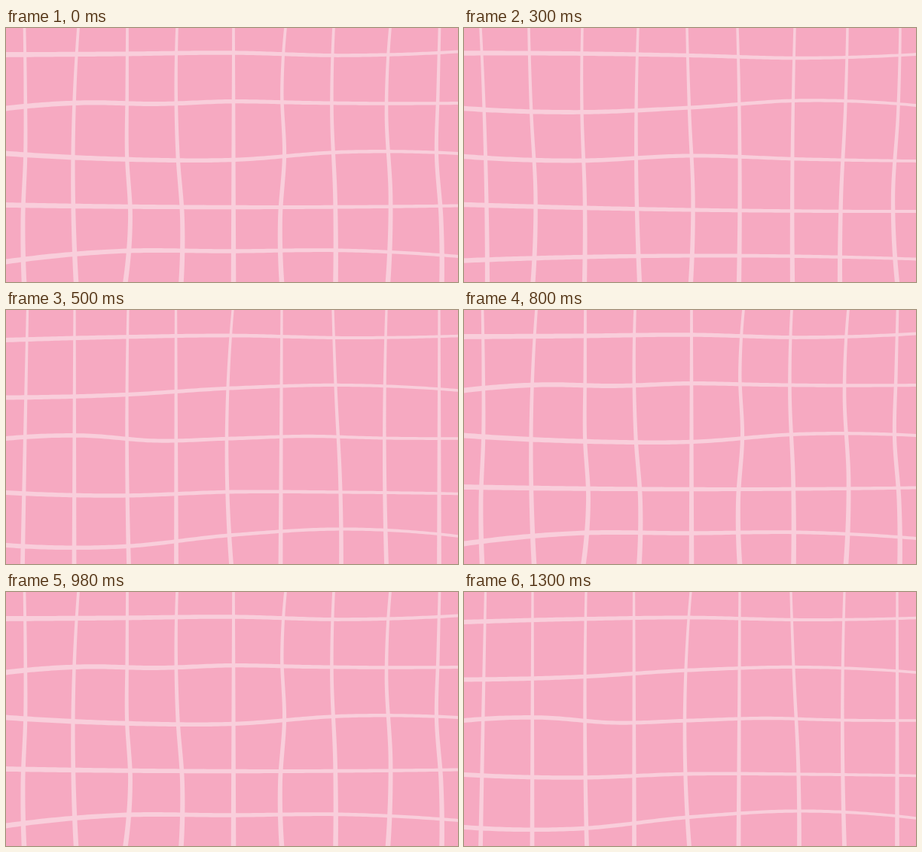
These frames come from a looping animation (600x338 px, 1500 ms). An HTML page with a canvas:

```html
<!DOCTYPE html>
<html lang="en">
<head>
<meta charset="utf-8">
<title>Wobbly grid</title>
<style>
  html, body { margin: 0; height: 100%; overflow: hidden; background: #f6a9c1; }
  canvas { display: block; }
</style>
</head>
<body>
<canvas id="stage" width="600" height="338"></canvas>
<script>
const W = 600, H = 338;
const ctx = document.getElementById('stage').getContext('2d');
const mix = (a, b, u) => a + (b - a) * u;

// Point before b that continues the bend of b, c, d
const before = (b, c, d = 2 * c - b) => 3 * (b - c) + d;

// Smooth curve through evenly spaced key points, u from 0 to 1
function curve(keys, u) {
  const pos = u * (keys.length - 1);
  const i = Math.min(Math.floor(pos), keys.length - 2), t = pos - i;
  const b = keys[i], c = keys[i + 1];
  const a = keys[i - 1] ?? before(b, c, keys[i + 2]);
  const d = keys[i + 2] ?? before(c, b, keys[i - 1]);
  return b + t / 2 * (c - a + t * (2 * a - 5 * b + 4 * c - d + t * (3 * (b - c) + d - a)));
}

// Hand-drawn stroke whose width tapers from w0 to w1
function ribbon(keys, w0, w1, toPoint) {
  const shape = new Path2D(), far = [];
  for (let u = 0; u <= 1; u += 1 / 128) {
    const mid = curve(keys, u), half = mix(w0, w1, u) / 2;
    shape.lineTo(...toPoint(u, mid - half));
    far.unshift(toPoint(u, mid + half));
  }
  for (const p of far) shape.lineTo(...p);
  return shape;
}

// Rows take heights from left to right, columns take x from top to bottom
function sketch(pen, draw) {
  const shapes = [];
  const row = (...ys) => shapes.push(ribbon(ys, 6.8 * pen, 4 * pen, (u, y) => [u * W, y]));
  const col = (...xs) => shapes.push(ribbon(xs, 3.7 * pen, 6.6 * pen, (u, x) => [x, u * H]));
  draw(row, col);
  return shapes;
}

const poses = [
  sketch(1, (row, col) => {
    row(35.5, 34.5, 33, 36.5, 31.5);
    row(107, 99.5, 101, 97.7, 99.5, 100.5, 100);
    row(167, 174.5, 175.5, 165, 167);
    row(235.5, 238.5, 236.5);
    row(311, 297, 297, 296, 304);
    col(24.5, 25.7, 25.7, 22.5, 24);
    col(96, 89, 93);
    col(161, 160.7, 160.5, 165, 158.5);
    col(227, 225.7, 228, 234, 232.5);
    col(302, 302);
    col(371, 366.3, 369.5, 364, 366);
    col(435, 432.5, 437, 437.5);
    col(510, 505, 510.5, 507);
    col(575.5, 573.5, 571.5, 577.5, 578.5);
  }),
  sketch(0.94, (row, col) => {
    row(33.5, 34, 36.5, 40, 35);
    row(107, 112, 106, 96.5, 103);
    row(171, 176.5, 170, 174.5, 177);
    row(235, 242, 244);
    row(309.5, 303, 307.5);
    col(22, 28.5, 31);
    col(86, 89.3, 95, 91.5);
    col(157, 156.5, 160.3, 160);
    col(231, 228.5, 233);
    col(296, 299.2, 304, 301);
    col(363, 366, 365);
    col(439, 436, 436);
    col(509, 506, 500.5, 499);
    col(579, 576.2, 569.5, 575);
  }),
  sketch(0.88, (row, col) => {
    row(40, 36, 34, 37, 34.5);
    row(116.5, 113, 104, 100, 107);
    row(171, 167, 174, 171, 168, 170.5, 171);
    row(243, 247, 242, 242.5, 244.5);
    row(313, 315, 299.5, 291.5, 301);
    col(28.5, 22);
    col(91, 90.5);
    col(162, 160.5, 163);
    col(225.5, 226);
    col(301, 293, 299);
    col(366, 364.5);
    col(434, 438, 443.5, 445);
    col(505, 502.3, 505);
    col(575, 575);
  })
];

const starts = [0, 300, 500, 800, 1100, 1300];

function frame() {
  const t = performance.now() % 1500;
  const beat = starts.findLastIndex(s => s <= t);
  ctx.fillStyle = '#f6a9c1';
  ctx.fillRect(0, 0, W, H);
  ctx.fillStyle = '#f9cedb';
  for (const shape of poses[beat % 3]) ctx.fill(shape);
  requestAnimationFrame(frame);
}
frame();
</script>
</body>
</html>
```
